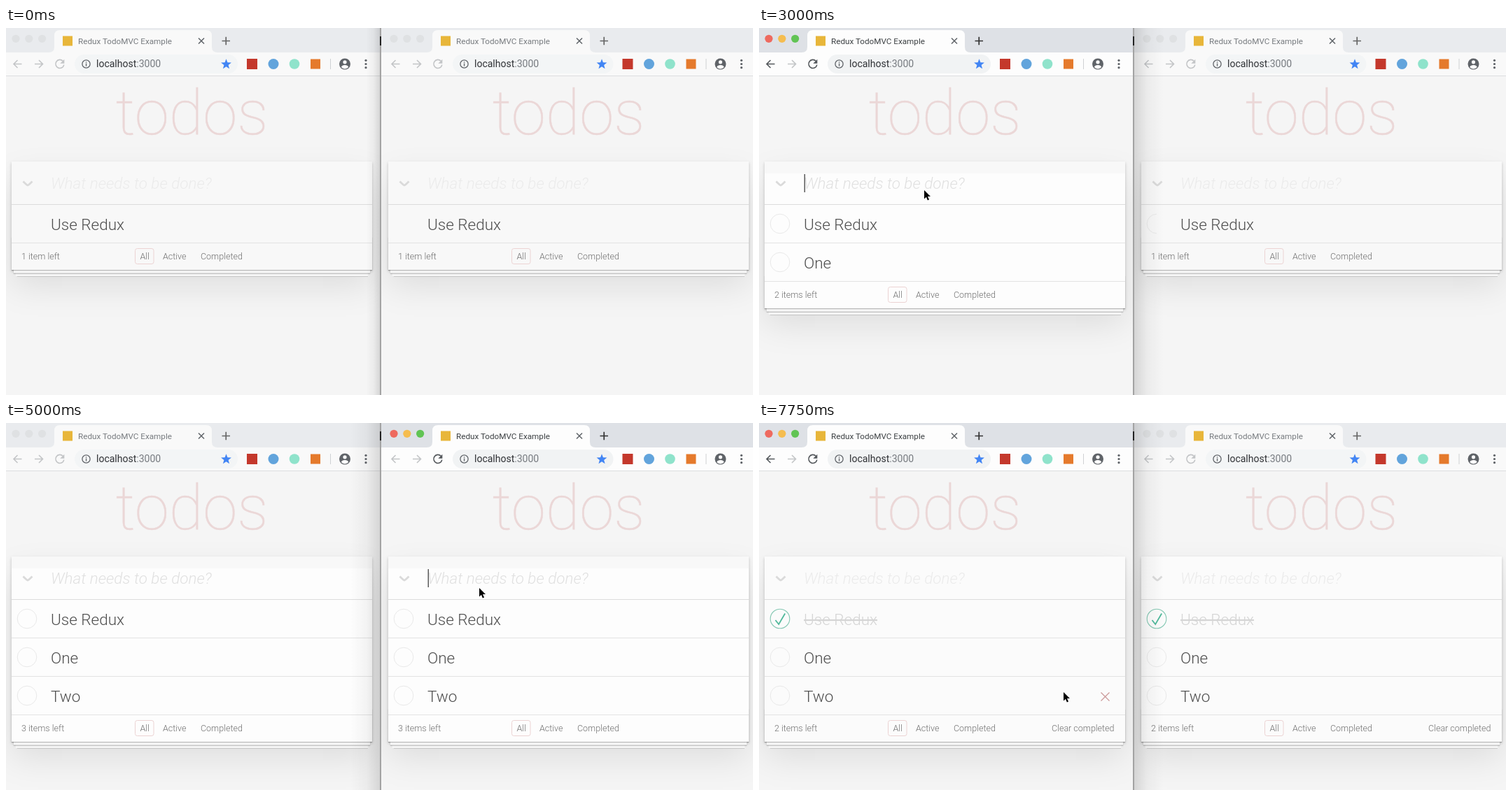
Recreate the animation shown at these times as an HTML page. Size 1067 by 525 pixels, loop 8000 ms.

```html
<!DOCTYPE html>
<html lang="en">
<head>
<meta charset="utf-8">
<title>Todos in two windows</title>
<style>
html, body { margin: 0; width: 100%; height: 100%; overflow: hidden; background: #f5f5f5; }
#stage { position: absolute; left: 0; top: 0; width: 1067px; height: 525px; overflow: hidden; background: #a3a3a3; }
.win { position: absolute; top: 0; height: 525px; overflow: hidden; background: #f5f5f5; }
.card { position: absolute; top: 191px; width: 515px;
  box-shadow: 0 2px 4px rgba(0,0,0,.2), 0 23px 47px rgba(0,0,0,.1); }
.sheets { position: absolute; left: 0; right: 0; bottom: 0; height: 47px;
  box-shadow: 0 1px 1px rgba(0,0,0,.26), 0 7.5px 0 -2.8px #f6f6f6, 0 8.5px 1px -2.8px rgba(0,0,0,.28),
    0 15px 0 -5.6px #f6f6f6, 0 16px 1.5px -5.6px rgba(0,0,0,.28); }
.shade { position: absolute; top: 0; bottom: 0; }
svg { position: absolute; left: 0; top: 0; overflow: visible; }
text { font-family: Roboto, "Liberation Sans", sans-serif; font-weight: 300; }
</style>
</head>
<body>
<div id="stage"></div>
<script>
const LOOP = 8000, STEP = 250;
const ITEMS = ['Use Redux', 'One', 'Two'];
const stage = document.getElementById('stage');
const pen = document.createElement('canvas').getContext('2d');

// value of the last [time, value] pair reached
const at = (t, ...pairs) => pairs.filter(p => p[0] <= t).pop()[1];
const text = (x, y, s, size, fill, more = '') =>
  `<text x="${x}" y="${y}" font-size="${size}" fill="${fill}" ${more}>${s}</text>`;
const rect = (x, y, w, h, fill, more = '') =>
  `<rect x="${x}" y="${y}" width="${w}" height="${h}" fill="${fill}" ${more}/>`;
const dot = (x, y, r, fill, more = '') => `<circle cx="${x}" cy="${y}" r="${r}" fill="${fill}" ${more}/>`;
const line = (d, stroke, width = 1, more = '') =>
  `<path d="${d}" fill="none" stroke="${stroke}" stroke-width="${width}" ${more}/>`;
const fill = (d, color, more = '') => `<path d="${d}" fill="${color}" ${more}/>`;
const shift = (dx, body) => `<g transform="translate(${dx})">${body}</g>`;

function star(x, y, r) {
  const points = Array.from({ length: 10 }, (_, i) => {
    const a = Math.PI * (i / 5 - .5), q = i % 2 ? r * .42 : r;
    return `${(x + q * Math.cos(a)).toFixed(2)},${(y + q * Math.sin(a)).toFixed(2)}`;
  });
  return `<polygon points="${points.join(' ')}" fill="#4285f4"/>`;
}

function browser({ tabX, iconX, lit, active, canGoBack }) {
  const grey = '#5f6368', pale = '#c3c5c7';
  const lights = lit ? ['#ee6a5f', '#f5bd4f', '#61c454'] : Array(3).fill(active ? '#d6d9dd' : '#dfe1e3');
  const nav = on => active && on ? '#54585c' : pale;
  const left = lights.map((c, i) => dot(14 + i * 18.8, 15.3, 5.6, c)).join('') +
    fill('M61 35q8 0 8-8V11q0-8 8-8H286q8 0 8 8V27q0 8 8 8z', active ? '#fdfdfd' : '#f9f9f9') +
    rect(81, 11.5, 14, 14, '#e8b63a') +
    text(103, 23, 'Redux TodoMVC Example', 11.7, active ? '#3c4043' : '#777b7f', 'style="font-weight:400"') +
    line('M275 14.5l8 8m0-8l-8 8', grey, 1.5) +
    line('M308.5 18.5h11.5m-5.75-5.75v11.5', active ? '#333' : '#666', 1.7);
  const buttons = line('M22.5 51.5H11M16.5 46l-5.5 5.5 5.5 5.5', nav(canGoBack), 1.6) +
    line('M41 51.5h11.5M47 46l5.5 5.5-5.5 5.5', pale, 1.6) +
    line('M81.3 47.3a6 6 0 1 0 1.5 5.3', nav(true), 1.6) + fill('M83.3 44.8v6h-6z', nav(true)) +
    dot(114.5, 51.5, 5.6, 'none', `stroke="${grey}" stroke-width="1.3"`) +
    rect(113.9, 50.6, 1.3, 4, grey) + rect(113.9, 48.3, 1.3, 1.3, grey) +
    text(129, 56, 'localhost<tspan fill="#777b80">:3000</tspan>', 14, '#303236', 'style="font-weight:400"');
  const right = star(314.5, 52, 7.8) +
    rect(344, 44, 15, 15, '#c4382c') + dot(382, 51.5, 7.5, '#62a4dc') +
    dot(412, 51.5, 7.3, '#8fe3cb') + rect(435, 44.5, 14, 14, '#e57a2c') +
    rect(463, 44, 1, 15, '#cfd1d4') +
    dot(484, 51.5, 8, grey) + dot(484, 48.8, 2.6, '#fff') + fill('M478.8 56q1-3 5.2-3t5.2 3q-2 2.4-5.2 2.4t-5.2-2.4z', '#fff') +
    [46.3, 51.5, 56.7].map(y => dot(514, y, 1.6, grey)).join('');
  return rect(0, 0, 540, 35, active ? '#dee1e6' : '#e9ebee') +
    rect(0, 35, 540, 33, active ? '#fdfdfd' : '#f9f9f9') + rect(0, 68, 540, 1, '#dcdddf') +
    rect(98 + tabX, 38, 233 + iconX - tabX, 27, active ? '#f1f3f4' : '#f3f5f6', 'rx="13.5"') +
    shift(tabX, left + buttons) + shift(iconX, right);
}

function row(i, { done, rings, hover }) {
  const y = 252 + 55 * i, off = i === 0 && done;
  let s = text(64, y + 37, ITEMS[i], 22.5, off ? '#d5d5d5' : '#4d4d4d', off ? 'text-decoration="line-through"' : '');
  if (off) s += dot(30, y + 28, 13.8, 'none', 'stroke="#85c8b3" stroke-width="1.1"') +
    line(`M23.5 ${y + 30}l4.7 6 9-15.5`, '#4fb99b', 1.8);
  else if (rings === 2) s += dot(30, y + 28, 13.8, 'none', 'stroke="#e9e9e9"');
  else if (rings === 1) s += line(`M30 ${y + 14.2}a13.8 13.8 0 0 0 0 27.6`, '#e9e9e9');
  if (hover === i) s += line(`M488.5 ${y + 33}l12 12m0-12l-12 12`, '#cc9a9a', 1.3, 'transform="translate(0 -9.5)"');
  return s + rect(8, y + 55, 515, 1, '#e3e3e3');
}

function page(w) {
  const { n, done, typed, caret, bright } = w;
  const foot = 252 + 55 * n, left = done ? n - 1 : n;
  const label = (x, s) => text(x, foot + 24, s, 12.5, '#6f6f6f');
  let s = text(265.5, 152, 'todos', 89, '#ebd7d7',
    'text-anchor="middle" stroke="#ebd7d7" stroke-width=".5" style="font-weight:100"');
  if (bright) s += rect(8, 191, 515, 17, '#f8f8f8');
  s += line('M24.5 219.5q5.5 5.5 6.5 5.5t6.5-5.5', '#dadada', 2.8) +
    (typed ? text(64, 230, typed, 22.5, '#4d4d4d')
      : text(64, 230, 'What needs to be done?', 22.5, bright ? '#e0e0e0' : '#ebebeb', 'font-style="italic"'));
  if (caret) {
    pen.font = '300 22.5px Roboto, "Liberation Sans", sans-serif';
    s += rect(64.6 + pen.measureText(typed).width, 209, 1.2, 26, '#333');
  }
  s += rect(8, 252, 515, 1, '#dcdcdc');
  for (let i = 0; i < n; i++) s += row(i, w);
  s += label(22, `${left} item${left > 1 ? 's' : ''} left`) +
    label(191.5, 'All') + label(224, 'Active') + label(278, 'Completed') +
    rect(184.5, foot + 8.5, 26.5, 22, 'none', 'rx="3" stroke="#ecd3d3"');
  return s + (done ? label(418, 'Clear completed') : '');
}

// shadow that the neighbouring window casts on this one
function shade(side, width) {
  const to = side === 'left' ? 'right' : 'left';
  return `<div class="shade" style="${side}:0;width:${width}px;
    background:linear-gradient(to ${to},rgba(0,0,0,.13),rgba(0,0,0,.04) 45%,transparent)"></div>`;
}

function windowHtml(w) {
  const bottom = 252 + 55 * w.n + 39;
  return `<div class="win" style="left:${w.x}px;width:${w.width}px">
    <div class="card" style="left:${8 + w.pageX}px;height:${bottom - 191}px;background:${w.paper}"><div class="sheets"></div></div>
    <svg width="${w.width}" height="525">${shift(w.pageX, page(w))}${browser(w)}</svg>
    ${w.shade}
  </div>`;
}

const PATH = [
  [250, 648, 496], [500, 560, 330], [750, 440, 196], [1000, 300, 152], [1250, 236, 231],
  [3250, 236, 231], [3500, 470, 238], [3750, 676, 235],
  [5000, 676, 235], [5250, 540, 248], [5750, 70, 294], [6000, 31, 288],
  [6750, 31, 288], [7750, 435, 384]
];
function pointer(t) {
  if (t < PATH[0][0]) return null;
  const i = PATH.findIndex(p => p[0] > t);
  if (i < 0) return PATH[PATH.length - 1].slice(1);
  const [a, b] = [PATH[i - 1], PATH[i]], k = (t - a[0]) / (b[0] - a[0]);
  return [1, 2].map(j => a[j] + (b[j] - a[j]) * k);
}

function scene(t) {
  const tip = pointer(t);
  const leftLit = at(t, [0, 0], [1500, 1], [3750, 0], [6000, 1]);
  const rightLit = at(t, [0, 0], [3750, 1], [6000, 0]);
  const leftPaper = at(t, [0, '#f8f8f8'], [2500, '#fdfdfd'], [3500, '#fbfbfb'], [4500, '#fdfdfd'], [5750, '#fcfcfc'], [7000, '#fbfbfb']);
  const rightPaper = at(t, [0, '#f8f8f8'], [3250, '#fbfbfb'], [4500, '#fdfdfd'], [7000, '#fbfbfb']);
  const left = {
    x: 0, width: 534, pageX: 0, tabX: 0, iconX: 0, canGoBack: true,
    lit: leftLit, active: at(t, [0, 0], [1500, 1], [4000, 0], [6250, 1]),
    n: at(t, [0, 1], [3000, 2], [5000, 3]), done: t >= 6500,
    typed: at(t, [0, ''], [2500, 'O'], [2750, 'One'], [3000, '']),
    caret: at(t, [0, 0], [2000, 1], [3500, 0], [6000, 1], [6250, 0]),
    rings: t < 2500 ? 0 : 2, paper: leftPaper, bright: leftPaper === '#fdfdfd',
    hover: t >= 6250 ? Math.floor((tip[1] - 252) / 55) : -1,
    shade: leftLit ? '' : shade('right', rightLit ? 42 : 20)
  };
  const right = {
    x: 536, width: 531, pageX: 2, tabX: 4, iconX: .5, canGoBack: false,
    lit: rightLit, active: at(t, [0, 0], [4000, 1], [6250, 0]),
    n: at(t, [0, 1], [3250, 2], [5000, 3]), done: t >= 7000,
    typed: at(t, [0, ''], [4500, 'T'], [4750, 'Two'], [5000, '']),
    caret: at(t, [0, 0], [4000, 1], [5500, 0]),
    rings: at(t, [0, 0], [1500, 1], [3250, 2]), paper: rightPaper, bright: rightPaper === '#fdfdfd',
    hover: -1, shade: leftLit ? shade('left', 42) : ''
  };
  const arrow = tip ? fill('M0 1V13.5l2.9-2.7 2 4.6 2.1-.9-2-4.4h4z', '#000',
    `transform="translate(${tip})" stroke="#fff" stroke-width="1" paint-order="stroke"`) : '';
  return windowHtml(left) + windowHtml(right) +
    `<svg width="1067" height="525">${rect(534, 12, 2, 13, '#222')}${arrow}</svg>`;
}

const start = performance.now();
let shown = -1;
function frame() {
  const t = Math.floor(((performance.now() - start) % LOOP) / STEP) * STEP;
  if (t !== shown) stage.innerHTML = scene(shown = t);
  requestAnimationFrame(frame);
}
frame();
</script>
</body>
</html>
```
